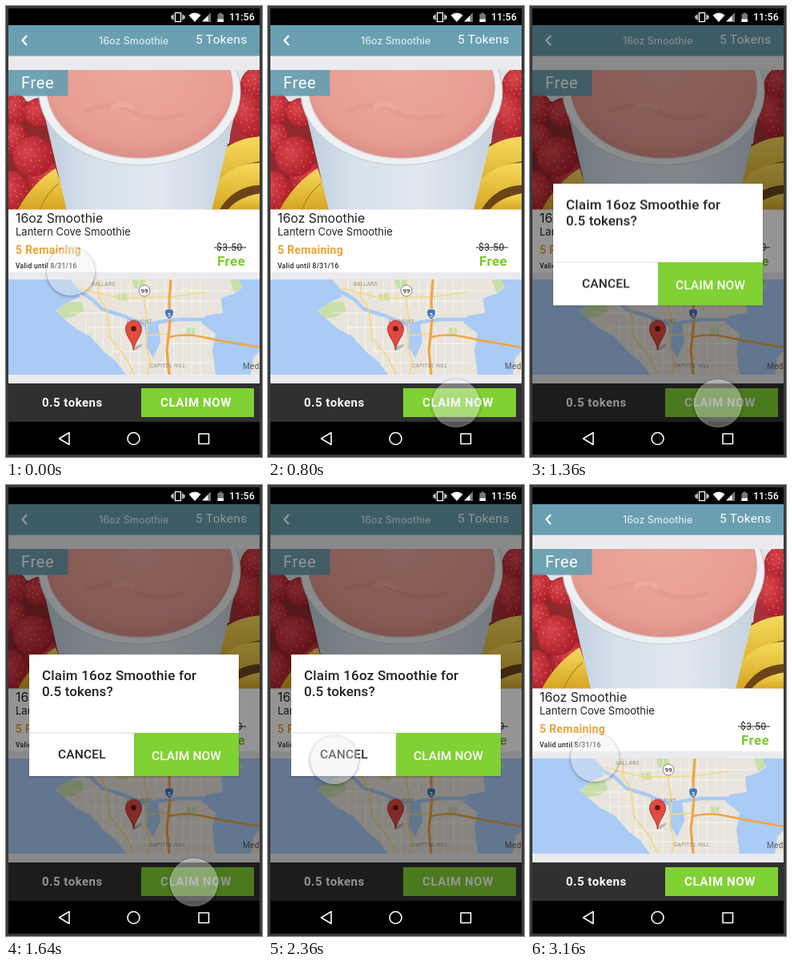
These frames come from a looping animation (320 by 564 pixels, 3.2 s). An HTML page:

```html
<!DOCTYPE html>
<html lang="en">
<head>
<meta charset="utf-8">
<title>Claim dialog</title>
<style>
  html, body { margin: 0; width: 100%; height: 100%; overflow: hidden; background: #000; }
  #stage { position: absolute; left: 0; top: 0; width: 320px; height: 564px; overflow: hidden; }
  svg { display: block; }
  text { font-family: Roboto, sans-serif; white-space: pre; }
  .round { font-family: Inter, sans-serif; }
  .mid { font-weight: 500; }
  .bold { font-weight: 700; }
  .white { fill: #fff; }
  .line { fill: none; stroke: #fff; }
  .land { fill: #e9e5dc; }
  .place { font-size: 6.5px; fill: #8d8b88; font-style: italic; letter-spacing: .4px; }
  #touch {
    position: absolute; left: -30px; top: -30px; width: 60px; height: 60px; border-radius: 50%;
    background: linear-gradient(rgba(240,240,240,.4), rgba(232,232,232,.36));
    box-shadow: 0 1px 4px rgba(0,0,0,.38), inset 0 0 3px rgba(255,255,255,.3);
  }
</style>
</head>
<body>
<div id="stage">
<svg width="320" height="564" viewBox="0 0 320 564">
  <defs>
    <clipPath id="photoClip"><rect x="3" y="80" width="314" height="174.5"/></clipPath>
    <clipPath id="mapClip"><rect x="3" y="342" width="314" height="119"/></clipPath>
    <linearGradient id="cup">
      <stop offset="0" stop-color="#bccbdb"/><stop offset=".25" stop-color="#d5e0ea"/>
      <stop offset=".6" stop-color="#e0e8f0"/><stop offset="1" stop-color="#c3d0de"/>
    </linearGradient>
    <radialGradient id="drink" cx=".5" cy=".4" r=".6">
      <stop offset="0" stop-color="#eda79c"/><stop offset=".8" stop-color="#e89d92"/>
      <stop offset="1" stop-color="#dc8f87"/>
    </radialGradient>
    <linearGradient id="banana" x2="0" y2="1">
      <stop offset="0" stop-color="#f5da5c"/><stop offset="1" stop-color="#d6a31f"/>
    </linearGradient>
    <radialGradient id="berry" cx=".4" cy=".35" r=".7">
      <stop offset="0" stop-color="#da454b"/><stop offset="1" stop-color="#a81c28"/>
    </radialGradient>
  </defs>

  <rect width="320" height="564" fill="#000"/>
  <rect x="3" y="24" width="314" height="496" fill="#ebebef"/>

  <!-- header -->
  <rect x="3" y="24" width="314" height="38.5" fill="#699fb0"/>
  <path class="line" d="M26 37L20.500 43L26 49" stroke-width="2.400"/>
  <text class="round mid" x="116" y="48" font-size="12.500" fill="#d9e8ed">16oz Smoothie</text>
  <text class="white" x="237" y="47" font-size="15.500" letter-spacing=".3">5 Tokens</text>

  <!-- photo -->
  <g clip-path="url(#photoClip)">
    <rect x="3" y="80" width="314" height="175" fill="#dfe3e6"/>
    <path d="M3 116L46 122L80 255H3Z" fill="#8f2a2c"/>
    <path d="M288 98L317 90V170L278 178Z" fill="#a5323a"/>
    <path d="M276 172H317V255H250Z" fill="#6b4518"/>
    <g id="berries"></g>
    <g fill="url(#banana)">
      <path d="M268 182Q290 164 320 163V194Q285 196 250 240Z"/>
      <path d="M252 236Q276 196 320 196V224Q285 224 266 256H246Z"/>
      <path d="M276 256Q290 238 320 234V256Z"/>
      <path d="M14 256Q32 222 62 203L80 256Z"/>
    </g>
    <path d="M42 256Q50 234 66 222" fill="none" stroke="#b98a1c" stroke-width="1.500"/>
    <path d="M41 106L76 256H257L293 106Z" fill="url(#cup)"/>
    <ellipse cx="167" cy="107" rx="126" ry="92" fill="#eef1f3" stroke="#c4ced6" stroke-width="1.200"/>
    <ellipse cx="167" cy="101.500" rx="117.500" ry="90" fill="#d9d8d8"/>
    <ellipse cx="167" cy="101" rx="116.500" ry="89" fill="url(#drink)"/>
    <g fill="none" stroke-linecap="round" stroke-width="6" opacity=".16">
      <path d="M100 130Q140 118 160 132T220 136" stroke="#d47d77"/>
      <path d="M134 126Q148 119 158 128" stroke="#ffd0c6"/>
    </g>
  </g>
  <rect x="3" y="80" width="74.500" height="32.500" fill="#699fb0" opacity=".94"/>
  <text class="white" x="19" y="103" font-size="20" letter-spacing=".7">Free</text>

  <!-- card -->
  <rect x="3" y="254.500" width="314" height="78.500" fill="#fff"/>
  <g fill="#222">
    <text class="round" x="12" y="271" font-size="15.800">16oz Smoothie</text>
    <text class="round" x="12" y="287" font-size="13">Lantern Cove Smoothie</text>
    <text class="mid" x="12" y="328" font-size="8.500" letter-spacing=".3">Valid until 8/31/16</text>
    <text x="263" y="306" font-size="12" letter-spacing=".5">$3.50</text>
    <rect x="260" y="301.500" width="40" height="1"/>
  </g>
  <text class="bold" x="12" y="310" font-size="14" letter-spacing=".3" fill="#eba338">5 Remaining</text>
  <text class="bold" x="264" y="324.500" font-size="17" letter-spacing=".4" fill="#7ccb32">Free</text>

  <!-- map -->
  <g clip-path="url(#mapClip)">
    <rect x="3" y="342" width="314" height="119" fill="#a9cbf6"/>
    <path class="land" d="M80 342L90 353L92 364L78 370L62 381L76 394L88 404L104 412L112 420L122 432L138 445L150 461H262L258 430L262 410L244 396L250 387L271 384L269 365L285 360L296 352L290 342ZM317 432L309 440L306 461H317Z"/>
    <g fill="#c9dfaa">
      <path d="M63 381L78 370L94 370L98 381L84 389L72 390Z"/>
      <path d="M158 342H172V353H160ZM280 342H290L296 352L285 358ZM226 402L237 403L235 413L226 412ZM138 361L150 359L153 370L141 369Z"/>
    </g>
    <g id="streets" fill="none" stroke="#fff" stroke-width=".8" opacity=".8"></g>
    <path d="M88 355L108 367L120 379L148 388L174 399L192 395L215 392L250 392" fill="none" stroke="#a9cbf6" stroke-width="4.500" stroke-linejoin="round"/>
    <path d="M173 398L190 395L193 420L184 440L176 427Z" fill="#a9cbf6"/>
    <g fill="none" stroke="#f6d77e" stroke-width="1.700">
      <path d="M173 342V372L177 395L175 425L180 445L177 461"/>
      <path d="M116 342V364L126 380L130 415L150 440L160 461M92 353L140 365L205 364L248 358M177 412L204 410"/>
    </g>
    <g fill="none" stroke="#f3a345" stroke-width="3.200">
      <path d="M206 342L204 370L205 392L203 414L201 430L204 461"/>
      <path d="M204 414Q224 409 246 414T317 427" stroke-width="2.700"/>
    </g>
    <text class="place" x="107" y="350">BALLARD</text>
    <text class="place" x="151" y="397">FREMONT</text>
    <text class="place" x="180" y="452">CAPITOL HILL</text>
    <text x="296" y="454" font-size="10" letter-spacing=".3" fill="#55585c">Med</text>
    <circle cx="173" cy="356" r="7" fill="#fff" stroke="#666" stroke-width=".8"/>
    <text class="mid" x="173" y="359" font-size="8" text-anchor="middle" fill="#333">99</text>
    <path d="M199 380Q204 377 209 380Q211 387 204 392Q197 387 199 380Z" fill="#4577bd" stroke="#fff" stroke-width=".7"/>
    <text class="white mid" x="204" y="389" font-size="7" text-anchor="middle">5</text>
    <ellipse cx="164" cy="427" rx="7" ry="2" transform="rotate(-30 164 427)" fill="#000" opacity=".2"/>
    <path d="M159.500 430C158 419 149.500 413 149.500 403.500A10 10 0 0 1 169.500 403.500C169.500 413 161 419 159.500 430Z" fill="#e34a40" stroke="#a92c25" stroke-width=".9"/>
    <circle cx="159.500" cy="403.500" r="3.300" fill="#5d1612"/>
  </g>

  <!-- toolbar -->
  <rect x="3" y="472" width="314" height="48" fill="#303031"/>
  <rect x="169" y="478" width="141" height="36" fill="#80d133"/>
  <g class="white bold" font-size="15">
    <text x="45" y="501" letter-spacing=".5">0.5 tokens</text>
    <text x="193" y="501" letter-spacing=".6">CLAIM NOW</text>
  </g>

  <rect id="shade" x="3" y="24" width="314" height="496" fill="#000" opacity="0"/>

  <g id="dialog">
    <rect x="28" y="213" width="264" height="153" fill="#000" opacity=".1"/>
    <rect x="29" y="212" width="262" height="152" fill="#fff"/>
    <rect x="29" y="309.500" width="131" height="1" fill="#dcdcdc"/>
    <rect x="160" y="310" width="131" height="54" fill="#80d133"/>
    <g class="mid" fill="#222">
      <text x="45" y="243.500" font-size="17" letter-spacing=".2">Claim 16oz Smoothie for</text>
      <text x="45" y="264" font-size="17" letter-spacing=".1">0.5 tokens?</text>
      <text x="65" y="341.500" font-size="15.500" letter-spacing=".2">CANCEL</text>
      <text class="white" x="182" y="343.500" font-size="15.500" letter-spacing=".1">CLAIM NOW</text>
    </g>
  </g>

  <!-- system bars -->
  <rect y="520" width="320" height="44" fill="#000"/>
  <g class="line" stroke-width="1.600" stroke-linejoin="round">
    <path d="M66.500 541L79 533.500V548.500Z"/>
    <circle cx="159.500" cy="541" r="7.500"/>
    <rect x="241" y="535" width="12.500" height="12.500"/>
  </g>
  <g class="line" stroke-width="1.300">
    <rect x="211.500" y="8.500" width="7" height="11"/>
    <path d="M209 10.500V17.500M221 10.500V17.500M207.200 12V16M222.800 12V16"/>
  </g>
  <path class="white" d="M228.500 11.500Q236 5.500 243.500 11.500L236 20ZM256 8.500V19.500H245Z"/>
  <path d="M256 8.500V19.500H252.500V12Z" fill="#777"/>
  <path d="M264.500 10H266.500V8.500H270V10H272V20H264.500Z" fill="#777"/>
  <rect class="white" x="264.500" y="16.500" width="7.500" height="3.500"/>
  <text class="white mid" x="279" y="18" font-size="12.500">11:56</text>
  <path d="M0 0H320V564H0ZM3 3V561H317V3Z" fill="#3a3a3a" fill-rule="evenodd"/>
</svg>
<div id="touch"></div>
</div>

<script>
const LOOP = 3200;
const $ = id => document.getElementById(id);

let seed = 7;
const rand = () => (seed = seed * 16807 % 2147483647) / 2147483647;

// Strawberries: x, y, rx, ry, tilt
const berries = [
  [10, 130, 17, 21, 10], [41, 133, 18, 18, -25], [309, 97, 16, 20, 20], [303, 137, 19, 29, -12],
  [10, 166, 16, 20, 0], [8, 232, 20, 26, -10], [47, 215, 20, 22, 25], [34, 188, 25, 25, -20]
];
$('berries').innerHTML = berries.map(([x, y, rx, ry, tilt]) => {
  let seeds = '';
  for (let i = 0; i < 22; i++) {
    const a = i * 2.4, d = Math.sqrt((i + rand()) / 26);
    seeds += `<ellipse cx="${rx * d * Math.cos(a)}" cy="${ry * d * Math.sin(a)}" rx=".7" ry="1.100"/>`;
  }
  return `<g transform="translate(${x} ${y}) rotate(${tilt})">
    <ellipse rx="${rx}" ry="${ry}" fill="url(#berry)"/>
    <g fill="#f0a08c" opacity=".6">${seeds}</g></g>`;
}).join('');

let roads = '';
for (let x = 100; x < 245; x += 11) {
  roads += `M${x} 342V${Math.min(386, 354 + (x - 90) * .3)}`;
  if (x < 168 || x > 192) roads += `M${x} ${x < 168 ? 386 : 401}V${Math.min(461, 412 + (x - 100) * .8)}`;
}
$('streets').innerHTML = `<path d="${roads}M100 356H280M145 369H266M80 384H130M100 402H166M196 422H255M130 432H168M150 446H256"/>`;

// Each step: [time, value, easing towards the next step]
const play = (id, prop, steps) => $(id).animate(
  steps.map(([time, value, easing = 'linear']) => ({ offset: time / LOOP, [prop]: value, easing })),
  { duration: LOOP, iterations: Infinity }
);
const at = (x, y) => `translate(${x}px, ${y}px)`;

const start = at(81, 332), claim = at(235, 497), cancel = at(83, 344), rest = at(81, 341);
play('touch', 'transform', [
  [0, start], [120, start, 'ease-in-out'], [720, claim], [1690, claim, 'ease-in-out'],
  [2240, cancel], [2380, cancel, 'ease-out'], [2620, rest], [LOOP, rest]
]);

const away = at(0, 352), open = at(0, 0);
play('dialog', 'transform', [
  [0, away], [970, away, 'ease'], [1470, open], [2484, open, 'ease-in-out'], [2914, away], [LOOP, away]
]);

play('shade', 'opacity', [
  [0, 0], [970, 0], [1140, .42], [2480, .42], [2620, 0], [LOOP, 0]
]);
</script>
</body>
</html>
```
